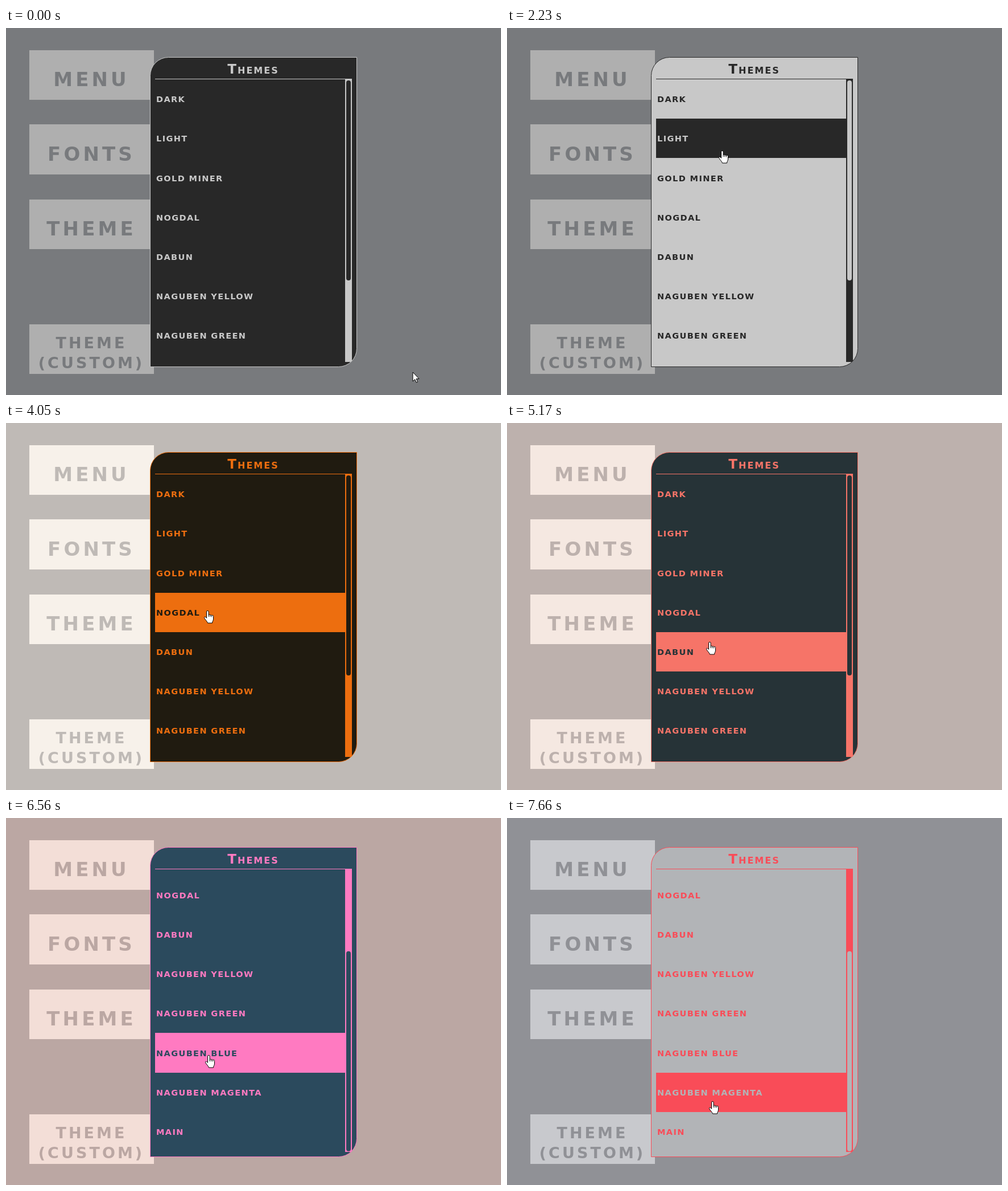
Animation of 870 by 644 pixels, one loop 8000 ms. Source, as an HTML page:

```html
<!DOCTYPE html>
<html lang="en">
<head>
<meta charset="utf-8">
<title>Theme picker</title>
<style>
  html, body { margin: 0; width: 100%; height: 100%; overflow: hidden; }
  svg { display: block; width: 870px; height: 644px; background: var(--bg); }
  text { font-family: "DejaVu Sans", sans-serif; font-weight: bold; }
  rect { shape-rendering: crispEdges; }
  .button rect { fill: var(--button); }
  .button text { fill: var(--bg); font-size: 34px; letter-spacing: .15em; text-anchor: middle; }
  .button .small { font-size: 27px; }
  .panel { fill: var(--panel); stroke: var(--accent); }
  .accent { fill: var(--accent); }
  .title { fill: var(--accent); font-size: 23px; font-variant: small-caps; letter-spacing: 2px; text-anchor: middle; }
  .row rect { fill: none; }
  .row text { fill: var(--accent); font-size: 14.5px; letter-spacing: 1.4px; }
  .row.hover rect { fill: var(--accent); }
  .row.hover text, #thumb { fill: var(--panel); }
  #thumb { shape-rendering: auto; }
  #cursor path { fill: #fff; stroke: #000; stroke-linejoin: round; }
</style>
</head>
<body>
<svg viewBox="0 0 870 644">
  <defs>
    <path id="outline" d="M285.5 51.5H616.5V562.5a32 32 0 0 1 -32 32H253.5V83.5a32 32 0 0 1 32 -32z"/>
    <clipPath id="panelClip"><use href="#outline"/></clipPath>
    <clipPath id="listClip"><rect x="262" y="90" width="346" height="496"/></clipPath>
  </defs>

  <g class="button"><rect x="41" y="39" width="219" height="87"/><text x="150" y="102">MENU</text></g>
  <g class="button"><rect x="41" y="169" width="219" height="88"/><text x="150" y="233">FONTS</text></g>
  <g class="button"><rect x="41" y="301" width="219" height="87"/><text x="150" y="364">THEME</text></g>
  <g class="button">
    <rect x="41" y="520" width="219" height="87"/>
    <text class="small" x="150" y="562">THEME</text>
    <text class="small" x="150" y="597">(CUSTOM)</text>
  </g>

  <use class="panel" href="#outline"/>
  <text class="title" x="434.5" y="80">Themes</text>
  <g clip-path="url(#panelClip)">
    <rect class="accent" x="262" y="89" width="346" height="1"/>
    <g clip-path="url(#listClip)"><g id="list"></g></g>
    <rect class="accent" x="596" y="90" width="12" height="496"/>
    <rect id="thumb" x="598" y="92" width="8" height="351" rx="4"/>
  </g>

  <g id="cursor">
    <path id="arrow" d="M0 0V16L3.7 12.5 6.2 18.1 8.5 17.1 6.1 11.6H11z"/>
    <g id="hand" transform="translate(-6 0)">
      <path d="M4.5 2.2a1.8 1.8 0 0 1 3.6 0V8a1.5 1.5 0 0 1 2.8 .6a1.5 1.5 0 0 1 2.8 .8a1.4 1.4 0 0 1 2.8 1V15c0 3 -2 4 -2 7H6.5c-.5 -3 -5.5 -6.5 -6 -9.5c0 -2 2.2 -1.6 4 .8z"/>
      <path d="M8.1 8v3M10.9 8.6v2.6M13.7 9.4v2"/>
    </g>
  </g>
</svg>

<script>
const LOOP = 8000, TICK = 100, ROW = 69.2, TOP = 90, MAX_SCROLL = 197, THUMB_TRAVEL = 141.7;
const labels = ["DARK", "LIGHT", "GOLD MINER", "NOGDAL", "DABUN",
  ...["YELLOW", "GREEN", "BLUE", "MAGENTA"].map(color => `NAGUBEN ${color}`), "MAIN"];

// Each theme starts half blended with the one before, for the given time.
const themes = [
  { at: 0, blend: 0, bg: "#787a7d", button: "#afafaf", panel: "#282828", accent: "#c8c8c8" },
  { at: 1640, blend: 90, bg: "#787a7d", button: "#afafaf", panel: "#c8c8c8", accent: "#282828" },
  { at: 2930, blend: 0, bg: "#07090b", button: "#3f3f3f", panel: "#0f0307", accent: "#a4700a" },
  { at: 3950, blend: TICK, bg: "#bfbab6", button: "#f7f1ea", panel: "#201b10", accent: "#ed6e0f" },
  { at: 5170, blend: TICK, bg: "#bba7a3", button: "#f3ded7", panel: "#2b4a5d", accent: "#ff7ac1" },
  { at: 7560, blend: TICK, bg: "#909196", button: "#c8c9cd", panel: "#b2b4b7", accent: "#f94c58" },
];

// Pointer glides: each one ends at the given tip position and scroll.
const glides = [
  { at: 0, end: 0, x: 715, y: 604 },
  { at: 400, end: 1130, x: 396, y: 149 },
  { at: 1230, end: 1430, x: 385, y: 200 },
  { at: 2230, end: 2430, x: 362, y: 252 },
  { at: 2740, end: 2930, x: 368, y: 263 },
  { at: 3450, end: 3650, x: 354, y: 329 },
  { at: 4650, end: 4950, x: 356, y: 384 },
  { at: 5870, end: 6060, x: 356, y: 384, scroll: MAX_SCROLL },
  { at: 6560, end: 6860, x: 355, y: 534, scroll: MAX_SCROLL },
  { at: 7150, end: 7370, x: 361, y: 497, scroll: MAX_SCROLL },
];

const $ = id => document.getElementById(id);
const svg = document.querySelector("svg");
const indexAt = (list, t) => list.findLastIndex(item => item.at <= t);
const mix = (a, b, p) => a + (b - a) * p;
const ease = p => p ** 1.11;

function make(name, attributes, parent) {
  const node = document.createElementNS(svg.namespaceURI, name);
  for (const key in attributes) node.setAttribute(key, attributes[key]);
  return parent.appendChild(node);
}

const rows = labels.map((label, i) => {
  const row = make("g", { class: "row", transform: `translate(0 ${TOP + i * ROW})` }, $("list"));
  make("rect", { x: 262, width: 334, height: ROW }, row);
  make("text", { x: 264, y: 40.3 }, row).textContent = label;
  return row;
});

function paintTheme(t) {
  const i = indexAt(themes, t), theme = themes[i];
  const blending = t < theme.at + theme.blend;
  for (const part of ["bg", "button", "panel", "accent"]) {
    svg.style.setProperty(`--${part}`, blending
      ? `color-mix(in srgb, ${themes[i - 1][part]}, ${theme[part]})` : theme[part]);
  }
}

function pointerAt(t) {
  const i = indexAt(glides, t), to = glides[i], from = glides[i - 1] ?? to;
  const steps = Math.round((to.end - to.at) / TICK) + 1;
  const length = (to.end - to.at) / (steps - 1) || TICK;
  const step = Math.min(steps, 1 + Math.floor((t - to.at) / length));
  const p = ease(step / steps);
  const scrollAt = k => mix(from.scroll ?? 0, to.scroll ?? 0, ease(k / steps));
  return {
    x: Math.round(mix(from.x, to.x, p)),
    y: Math.round(mix(from.y, to.y, p)),
    scroll: scrollAt(step),
    hoverScroll: scrollAt(step - 1), // hover lags one step behind the scroll
  };
}

function paintPointer(t) {
  const { x, y, scroll, hoverScroll } = pointerAt(t);
  const inside = x > 262 && x < 596 && y > TOP && y < 586;
  const hovered = inside ? Math.floor((y - TOP + hoverScroll) / ROW) : -1;
  rows.forEach((row, i) => row.classList.toggle("hover", i === hovered));
  $("list").setAttribute("transform", `translate(0 ${-scroll})`);
  $("thumb").setAttribute("y", 92 + scroll / MAX_SCROLL * THUMB_TRAVEL);
  $("cursor").setAttribute("transform", `translate(${x} ${y})`);
  $("arrow").style.display = inside ? "none" : "";
  $("hand").style.display = inside ? "" : "none";
}

const origin = performance.now();
function paint() {
  const t = (performance.now() - origin) % LOOP;
  paintTheme(t);
  paintPointer(t);
  requestAnimationFrame(paint);
}
paint();
</script>
</body>
</html>
```
